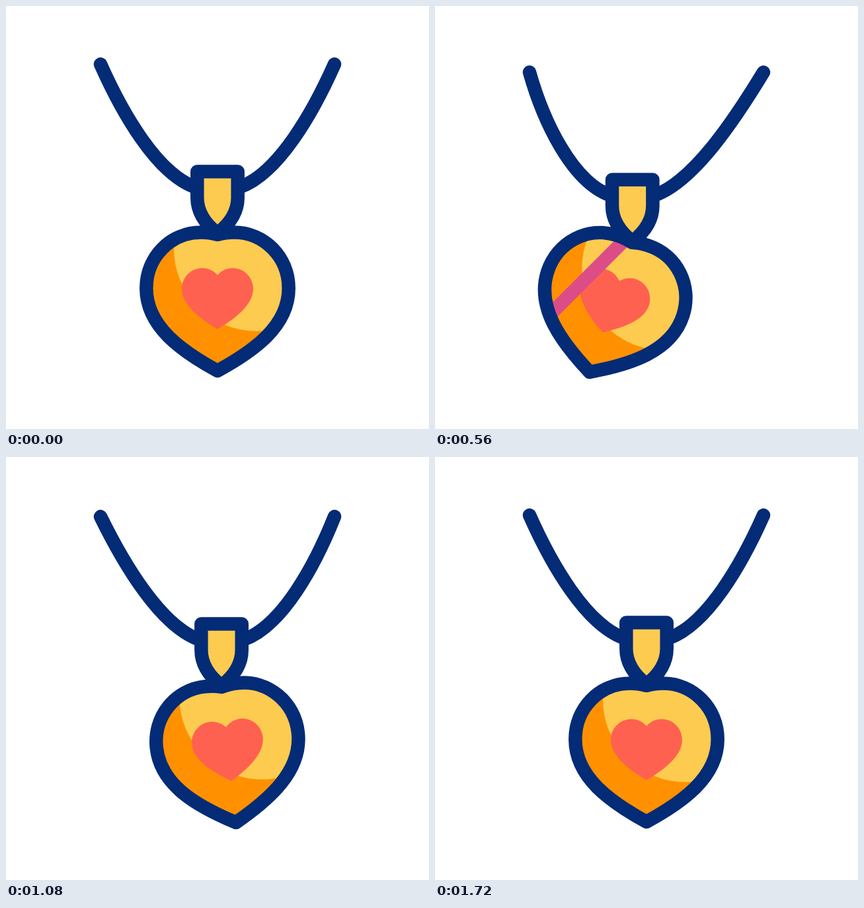
Animation of 640x640 px, one loop 1840 ms. Source, as an HTML page:

```html
<!DOCTYPE html>
<html lang="en">
<head>
<meta charset="utf-8">
<title>Heart pendant</title>
<style>
  html, body { margin: 0; width: 100%; height: 100%; overflow: hidden; background: #fff; }
  svg { display: block; width: 100%; height: 100%; }
  .line { stroke: #042b76; stroke-width: 20.5; stroke-linecap: round; stroke-linejoin: round; }
</style>
</head>
<body>
<svg viewBox="0 0 640 640">
  <defs>
    <path id="heart" d="M320 345.8C312 343.5 304 342.5 295 342.5C249 342.5 212.3 380 212.3 427C212.3 485 266 522.5 320 552
      C374 522.5 427.7 485 427.7 427C427.7 380 391 342.5 345 342.5C336 342.5 328 343.5 320 345.8Z"/>
    <clipPath id="inside"><use href="#heart" class="pendant"/></clipPath>
  </defs>
  <path id="cord" class="line" fill="none"/>
  <path id="bail" class="line" fill="#fdcb50" d="M289.3 250.5H350.7V290C350.7 312 338 330 320 344C302 330 289.3 312 289.3 290Z"/>
  <g clip-path="url(#inside)">
    <g class="pendant">
      <use href="#heart" fill="#ff9100"/>
      <circle cx="379" cy="367" r="125" fill="#fdcb50"/>
      <path fill="#ff6150" d="M320 407C314 400.5 306 396.5 297 396.5C280 396.5 266 410.5 266 428C266 454 297 475 320 489
        C343 475 374 454 374 428C374 410.5 360 396.5 343 396.5C334 396.5 326 400.5 320 407Z"/>
    </g>
    <path id="shine" d="M500 -500L-500 500" stroke="#dc4d88" stroke-width="20.5"/>
  </g>
  <g class="pendant"><use href="#heart" class="line" fill="none"/></g>
</svg>
<script>
const LOOP = 1840, STEP = 40;
const cord = document.getElementById('cord');
const bail = document.getElementById('bail');
const shine = document.getElementById('shine');
const pendant = document.querySelectorAll('.pendant');

// [time in ms, value]
const swayKeys = [[40, 0], [550, -21.3], [857, 14], [1280, 0]];
const dropKeys = [[40, 0], [680, 12.7], [1280, 0]];
const tiltKeys = [[160, 0], [586, 18.1], [972, -7], [1360, 2.4], [1740, 0]];

// cubic-bezier(.6, 0, .4, 1), solved by bisection
function ease(p) {
  let lo = 0, hi = 1;
  for (let i = 0; i < 24; i++) {
    const s = (lo + hi) / 2, r = 1 - s;
    if (1.8 * s * r * r + 1.2 * s * s * r + s ** 3 < p) lo = s; else hi = s;
  }
  return lo * lo * (3 - 2 * lo);
}

function valueAt(keys, t) {
  if (t <= keys[0][0]) return keys[0][1];
  for (let i = 1; i < keys.length; i++) {
    const [t0, a] = keys[i - 1], [t1, b] = keys[i];
    if (t < t1) return a + (b - a) * ease((t - t0) / (t1 - t0));
  }
  return keys[keys.length - 1][1];
}

function draw(now) {
  const t = Math.floor(now % LOOP / STEP) * STEP;
  const x = valueAt(swayKeys, t), y = valueAt(dropKeys, t), tilt = valueAt(tiltKeys, t);
  const bend = x * 0.55;

  cord.setAttribute('d',
    `M143 ${88 + y}C${175 + bend} ${160 + y} ${228 + x} ${254 + y} ${287 + x} ${274.5 + y}` +
    `H${353 + x}C${412 + x} ${254 + y} ${465 + bend} ${160 + y} 497 ${88 + y}`);
  bail.setAttribute('transform', `translate(${x} ${y})`);
  for (const part of pendant) {
    part.setAttribute('transform', `translate(${x} ${y}) rotate(${tilt} 320 343)`);
  }
  const shift = (641 + (t - 560) * 0.925) / 2;
  shine.setAttribute('transform', `translate(${shift} ${shift})`);
  requestAnimationFrame(draw);
}
draw(performance.now());
</script>
</body>
</html>
```
